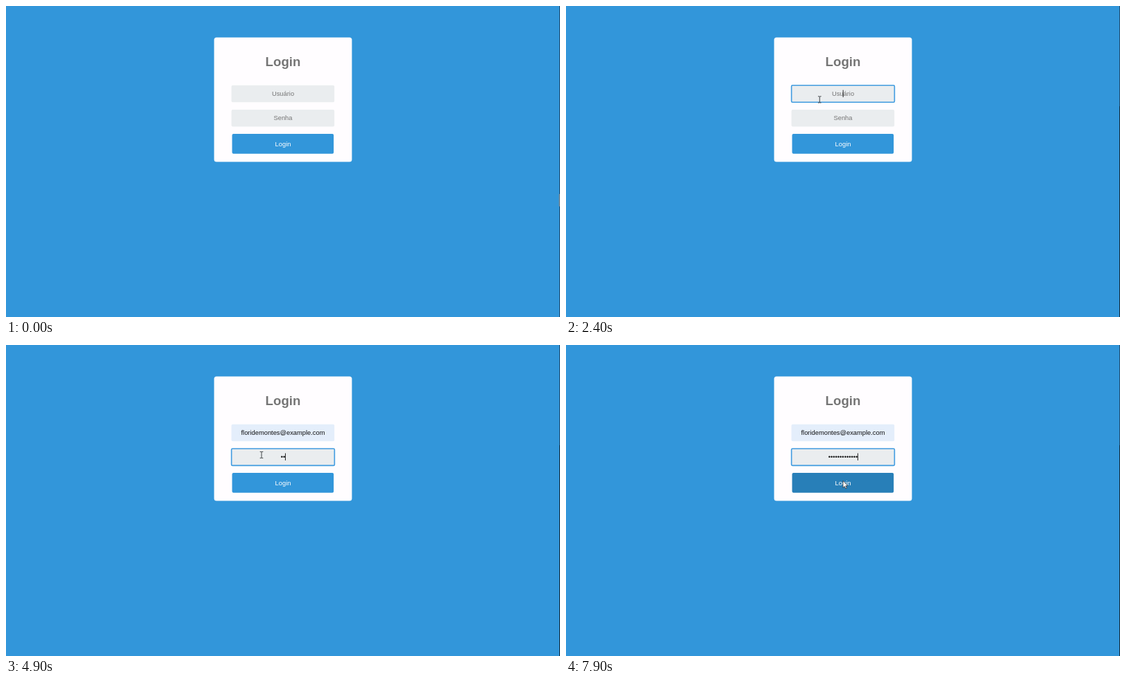
Animation, 800 px wide and 450 px high, one loop 8000 ms. Source, as an HTML page:

```html
<!DOCTYPE html>
<html lang="pt">
<head>
<meta charset="utf-8">
<title>Login</title>
<style>
  html, body { margin: 0; width: 100%; height: 100%; overflow: hidden; background: #3296da; }
  svg { display: block; width: 800px; height: 450px; }
  text { font: 9.333px "Liberation Sans", Arial, sans-serif; text-anchor: middle; fill: #757575; }
  .title { font-size: 18.667px; font-weight: bold; }
  .value { fill: #111; }
  .focus { fill: none; stroke: #3f9be0; stroke-width: 1.6; }
</style>
</head>
<body>
<svg viewBox="0 0 800 450">
  <rect width="800" height="450" fill="#3296da"/>
  <rect x="799" width="1" height="450" fill="#1f4d70"/>
  <rect id="thumb" x="798.5" y="272" width="1.5" height="18" fill="#77858f"/>
  <rect id="track" x="799" y="145" width="1" height="305" fill="#12293a"/>

  <rect x="300.5" y="45.5" width="199" height="180" rx="3.5" fill="#fffdff"/>
  <text class="title" x="400" y="86.5">Login</text>

  <rect id="userBox" x="325.5" y="114.8" width="148.7" height="24.4" rx="2"/>
  <rect id="userFocus" class="focus" x="325.6" y="114.8" width="148.8" height="24.4" rx="1.5"/>
  <text id="user" x="400" y="130.2"></text>

  <rect x="325.5" y="150" width="148.7" height="24.5" rx="2" fill="#eaedef"/>
  <rect id="passFocus" class="focus" x="325.6" y="150" width="148.8" height="24.4" rx="1.5"/>
  <text id="pass" x="400" y="165.3"></text>

  <rect id="button" x="326.5" y="185" width="146.7" height="28.7" rx="2"/>
  <text x="400" y="202.6" style="fill:#fff">Login</text>

  <rect id="caret" width="0.9" height="10.4" fill="#111"/>
  <path id="beam" d="M-2.3 -4.6H-.6L0 -4.1L.6 -4.6H2.3M0 -4.1V4.1M-2.3 4.6H-.6L0 4.1L.6 4.6H2.3"
        fill="none" stroke="#2b2f33" stroke-width="0.9"/>
  <path id="arrow" d="M0 0V10L2.3 7.9L3.8 11.3L5.4 10.6L3.9 7.3H7Z"
        fill="#fff" stroke="#222" stroke-width="0.7"/>
</svg>
<script>
const LOOP = 8000, STEP = 100;
const EMAIL = "floridemontes@example.com";
const FILL_AT = 2900, USER_AT = 1900, PASS_AT = 3700;

// time, x, y
const path = [
  [1000, 38, 328], [1800, 361, 136], [2000, 361.5, 125], [2200, 361.5, 125],
  [2700, 375, 154.5], [2900, 375, 154.5], [3300, 375, 159], [4600, 375, 159],
  [4900, 369, 159], [5600, 369, 159], [6500, 394.5, 163], [7100, 394.5, 163],
  [7800, 400, 196.5]
];
const keys = [4700, 4850, 5100, 5300, 5500, 5700, 5900, 6100, 6300, 6450, 6700, 6700, 6900];

const el = id => document.getElementById(id);
const clamp = v => Math.max(0, Math.min(1, v));
const ease = p => p * p * (3 - 2 * p);
const show = (id, on) => el(id).style.opacity = +on;

function pointer(t) {
  const i = path.findIndex(p => p[0] > t);
  if (i < 0) return path[path.length - 1].slice(1);
  if (i === 0) return path[0].slice(1);
  const a = path[i - 1], b = path[i];
  const k = ease((t - a[0]) / (b[0] - a[0]));
  return [a[1] + (b[1] - a[1]) * k, a[2] + (b[2] - a[2]) * k];
}

function setText(id, value, placeholder) {
  const node = el(id), text = value || placeholder;
  if (node.textContent !== text) node.textContent = text;
  node.setAttribute("class", value ? "value" : "");
  return value ? node.getComputedTextLength() / 2 : 0;
}

function caretOn(t) {
  if (t < USER_AT) return false;
  if (t < FILL_AT) return t < 2500;
  if (t < PASS_AT) return t < 3500;
  if (t < keys[0]) return t < 4200;
  return t < 7400 || t >= 7900;
}

function drawPointer(t) {
  const [x, y] = pointer(t);
  const inField = x > 325 && x < 475 && (y > 114 && y < 140 || y > 150 && y < 175);
  for (const id of ["beam", "arrow"]) el(id).setAttribute("transform", `translate(${x} ${y})`);
  show("beam", t >= 1000 && inField);
  show("arrow", t >= 1000 && !inField);
}

function draw(t) {
  show("thumb", t < 800);
  show("track", t >= 800);

  const filled = t >= FILL_AT;
  const userHalf = setText("user", filled ? EMAIL : "", "Usuário");
  el("userBox").setAttribute("fill", filled ? "#e4eefb" : "#eaedef");

  const count = keys.filter(k => k <= t).length;
  const passHalf = setText("pass", "•".repeat(count), "Senha");

  show("userFocus", t < PASS_AT
    ? (t < USER_AT ? 0 : clamp((t - 1800) / 400))
    : clamp(1 - (t - 3600) / 400));
  show("passFocus", t < PASS_AT ? 0 : clamp((t - 3600) / 250));

  const inPass = t >= PASS_AT;
  el("caret").setAttribute("x", 399.7 + (inPass ? passHalf : userHalf));
  el("caret").setAttribute("y", inPass ? 156.6 : 121.6);
  show("caret", caretOn(t));

  const hover = clamp((t - 7500) / 300);
  const mix = (a, b) => Math.round(a + (b - a) * hover);
  el("button").setAttribute("fill", `rgb(${mix(50, 40)},${mix(150, 127)},${mix(218, 184)})`);

  drawPointer(t);
}

const start = performance.now();
function frame() {
  const t = (performance.now() - start) % LOOP;
  draw(Math.floor(t / STEP) * STEP);
  requestAnimationFrame(frame);
}
frame();
</script>
</body>
</html>
```
